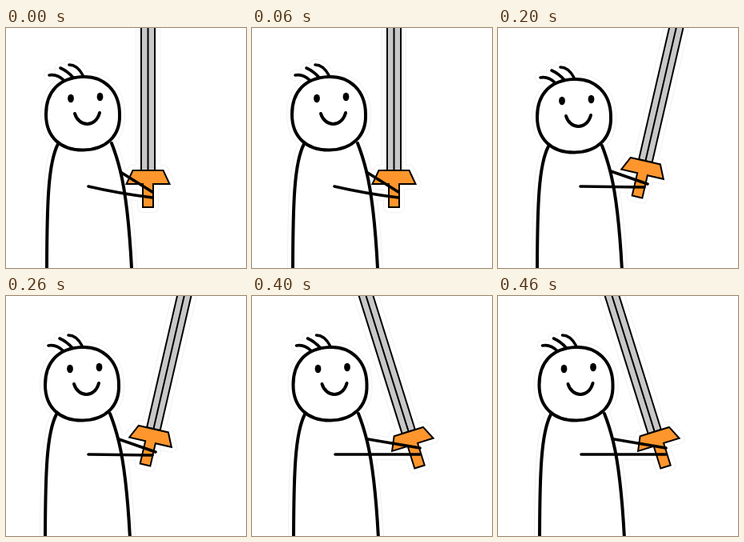
An HTML page without scripts that plays this animation: 300x300 px, repeating every 0.5 s.

```html
<!DOCTYPE html>
<html lang="en">
<head>
<meta charset="utf-8">
<title>Swordsman</title>
<style>
  html, body { margin: 0; width: 100%; height: 100%; overflow: hidden; background: #fff; }
  svg { display: block; width: 100vw; height: 100vh; }
  .ink { stroke: #000; fill: none; stroke-linecap: round; stroke-linejoin: round; }
  .line { stroke-width: var(--pad, 4px); }
  .arm { stroke-width: var(--pad, 3.6px); }
  .sword { stroke-width: var(--pad, 2px); stroke-linejoin: var(--join, miter); }
  .blade { fill: var(--fill, #c8c8c8); }
  .hilt { fill: var(--fill, #ff962d); }
  .eye { fill: var(--fill, #000); stroke: none; }
  /* Faint sticker edge: a wide grey stroke covered by a narrower white one */
  .edge { stroke: #f1f1f1; --pad: 14px; --fill: #fff; --join: round; }
  .mask { stroke: #fff; fill: #fff; --pad: 12px; --fill: #fff; --join: round; }
</style>
</head>
<body>
<svg viewBox="0 0 300 300">
  <defs>
    <g id="figure">
      <g class="line">
        <animateTransform attributeName="transform" type="translate" calcMode="discrete" dur=".5s" repeatCount="indefinite"
          values="0 0; -1 0; -2 3; -1 0; 1 3"/>
        <path d="M65 145C53 168 51 215 51 310L51 330M157 330L157 300C155 262 151 212 143 179Q138 159 132 144"/>
        <path stroke="none" d="M65 145C53 168 51 215 51 330H157V300C155 262 151 212 143 179Q138 159 132 144Z"/>
      </g>
      <g class="line">
        <animateTransform attributeName="transform" type="translate" calcMode="discrete" dur=".5s" repeatCount="indefinite"
          values="0 0; 1 1; -1 3; 0 0; 1.5 3"/>
        <path d="M96 61C122 60 142 78 142 108C143 135 125 152 97 152.500C68 153 50 136 50 108C50 80 66 62 96 61Z"/>
        <path class="arm" d="M54 59Q64 57 73 66M68 50Q77 54 84 62M79 46Q89 46 96 59"/>
        <path d="M86 107C91 124 112 125 117 106"/>
        <ellipse class="eye" cx="81" cy="88" rx="3.900" ry="5.200"/>
        <ellipse class="eye" cx="117.500" cy="86" rx="3.900" ry="5.200"/>
      </g>
      <g class="sword">
        <animateTransform attributeName="transform" type="translate" calcMode="discrete" dur=".5s" repeatCount="indefinite"
          values="177.5 224; 177.5 159; 174 211; 198.5 147; 209.5 213.5"/>
        <g>
          <animateTransform attributeName="transform" type="rotate" calcMode="discrete" dur=".5s" repeatCount="indefinite"
            values="0; 0; 13; 14; -17.4"/>
          <path class="blade" d="M-8.500 -46V-280H8.500V-46ZM0 -46V-280"/>
          <path class="hilt" d="M-19 -46H19L27 -29H6.500V0H-6.500V-29H-27Z"/>
        </g>
      </g>
      <path class="arm">
        <animate attributeName="d" calcMode="discrete" dur=".5s" repeatCount="indefinite"
          values="M143 180L183 205M103 198Q142 207 183 212;
                  M143 178L181 138M102 197L181 138;
                  M141 179L187 195M103 198L183 199;
                  M143 178L203 140M103 197L203 141;
                  M145 179L210 190M104 198L210 198"/>
      </path>
    </g>
  </defs>
  <g class="ink">
    <use href="#figure" class="edge"/>
    <use href="#figure" class="mask"/>
    <use href="#figure"/>
  </g>
</svg>
</body>
</html>
```
